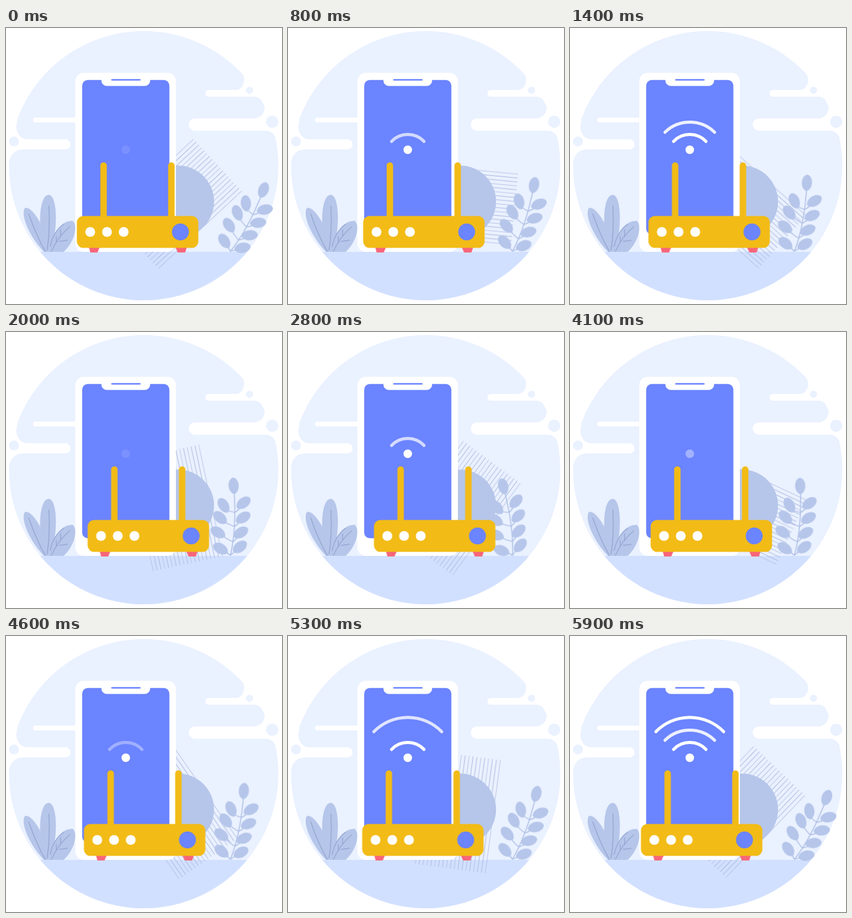
Recreate the animation shown at these times as an HTML page. Size 450 px wide and 450 px high, loop 6000 ms.

```html
<!DOCTYPE html>
<html lang="en">
<head>
<meta charset="utf-8">
<title>Router and phone</title>
<style>
  html, body { margin: 0; width: 100%; height: 100%; overflow: hidden; background: #fff; }
  svg { display: block; width: 100vw; height: 100vh; }

  .sky { fill: #eaf1ff; }
  .ground { fill: #d2e0ff; }
  .white { fill: #fff; }
  .blue { fill: #6b84ff; }
  .yellow { fill: #f2bb16; }
  .red { fill: #f8667a; }
  .leafy { fill: #b6c6ea; }
  .vein, .stem { fill: none; stroke-linecap: round; }
  .vein { stroke: #97a9d4; stroke-width: 1.5; }
  .stem { stroke: #b0c0e6; stroke-width: 1.6; }
  .hatch { stroke: #a9b8de; stroke-width: 186; stroke-dasharray: .9 5.5; }
  .wave { fill: none; stroke: #fff; stroke-width: 5; stroke-linecap: round; }

  .hatch, .plant, .router, .dot, .near, .mid, .far { animation: 6s linear infinite; }
  .hatch { animation-name: spin; transform-origin: 277px 287px; }
  .plant { animation-name: sway; transform-origin: 366px 364px; }
  .router { animation-name: slide; }
  .dot { animation-name: dot; }
  .near { animation-name: near; }
  .mid { animation-name: mid; }
  .far { animation-name: far; }

  @keyframes spin {
    0% { transform: rotate(-43deg); }
    99.2%, 100% { transform: rotate(317deg); }
  }
  @keyframes sway {
    0%, 99.2%, 100% { transform: rotate(26deg); }
    49.4% { transform: rotate(-12deg); }
  }
  @keyframes slide {
    0%, 98.6%, 100% { transform: translateX(0); }
    49.3% { transform: translateX(26px); }
  }

  /* Three signal build-ups; the last one lights the far wave before the middle one. */
  @keyframes dot {
    0% { opacity: .1; }
    7.2%, 32.49% { opacity: 1; }
    32.5% { opacity: 0; }
    40.5%, 65.32% { opacity: 1; }
    65.33% { opacity: 0; }
    73.3%, 100% { opacity: 1; }
  }
  @keyframes near {
    0%, 7.7% { opacity: 0; }
    15.7%, 32.49% { opacity: 1; }
    32.5%, 41% { opacity: 0; }
    49%, 65.32% { opacity: 1; }
    65.33%, 73.8% { opacity: 0; }
    81.8%, 100% { opacity: 1; }
  }
  @keyframes mid {
    0%, 16.2% { opacity: 0; }
    24.2%, 32.49% { opacity: 1; }
    32.5%, 49.5% { opacity: 0; }
    57.5%, 65.32% { opacity: 1; }
    65.33%, 91% { opacity: 0; }
    99.4%, 100% { opacity: 1; }
  }
  @keyframes far {
    0%, 24.7% { opacity: 0; }
    32.49% { opacity: 1; }
    32.5%, 58% { opacity: 0; }
    65.32% { opacity: 1; }
    65.33%, 82% { opacity: 0; }
    90%, 100% { opacity: 1; }
  }
</style>
</head>
<body>
<svg viewBox="0 0 450 450">
  <defs>
    <clipPath id="disc"><circle cx="224.5" cy="224.5" r="219.5"/></clipPath>
    <path id="leaf" d="M-13.5 0C-11-6-5-8.3 1-8.3C8-8.3 13.5-4 13.5 0C13.5 4 8 8.3 1 8.3C-5 8.3-11 6-13.5 0Z"/>
  </defs>

  <!-- Backdrop -->
  <g clip-path="url(#disc)">
    <rect class="sky" width="450" height="450"/>
    <rect class="ground" y="365" width="450" height="85"/>
  </g>
  <g class="white">
    <path d="M0 150H19C13 166 21 181.500 35 181.500H97A8.250 8.250 0 0 1 97 198H28C14 198 7 206 4 222H0Z"/>
    <path d="M450 74H385.500C392 86 386 101 375 101H330.500A5.500 5.500 0 0 0 330.500 112H404A17.750 17.750 0 0 1 404 147.500H308A10 10 0 0 0 308 167.500H422C434 167.500 440 174 443 192H450Z"/>
    <rect x="44" y="146" width="90" height="8" rx="4"/>
  </g>
  <g class="sky">
    <circle cx="13" cy="185" r="8"/>
    <circle cx="397" cy="101.500" r="5.700"/>
    <circle cx="434" cy="153" r="10"/>
  </g>

  <!-- Left bush -->
  <g class="leafy">
    <path d="M62 365C40 343 24 308 30 294.500C37 286 66 318 68 365Z"/>
    <path d="M65 365C50 328 54 272 69.500 272C84 272 85 328 73 365Z"/>
    <path d="M71 365C73 337 90 313 109 314.500C118 323 111 350 94 365Z"/>
  </g>
  <g class="vein">
    <path d="M37 303Q50 340 64 364M70 290Q72 330 67 362"/>
    <path d="M104 324Q85 340 74 364M89 340V329M82 350V340M87 348L100 346"/>
    <path d="M72 356Q77 332 94 320"/>
  </g>

  <!-- Hatching and disc -->
  <path class="hatch" d="M277 228.700V344.800"/>
  <circle class="leafy" cx="280.500" cy="283" r="58.700"/>

  <!-- Right plant -->
  <g class="plant leafy">
    <path class="stem" d="M366 364Q376 320 371 255M373 294Q362 293 355 286M373 294Q380 290 386 279M372 317Q360 313 350 305M372 317Q380 312 386 303M370 342Q358 337 347 328M370 342Q378 335 383 328M366 364L351 354M366 364L381 351"/>
    <use href="#leaf" transform="translate(370.500 251) rotate(-94)"/>
    <use href="#leaf" transform="translate(354.500 283) rotate(-122)"/>
    <use href="#leaf" transform="translate(386.500 278.500) rotate(-38)"/>
    <use href="#leaf" transform="translate(349 303) rotate(-138)"/>
    <use href="#leaf" transform="translate(386 302.500) rotate(-33)"/>
    <use href="#leaf" transform="translate(345.500 327) rotate(-150)"/>
    <use href="#leaf" transform="translate(382.500 327) rotate(-32)"/>
    <use href="#leaf" transform="translate(350 353.500) rotate(-150)"/>
    <use href="#leaf" transform="translate(381 350.500) rotate(-38)"/>
  </g>

  <!-- Phone -->
  <rect class="white" x="113" y="73" width="164" height="292" rx="14"/>
  <rect class="blue" x="124.200" y="84.800" width="142.200" height="251.400" rx="9"/>
  <path class="white" d="M155.500 80H235V85A9 9 0 0 1 226 94.500H164.500A9 9 0 0 1 155.500 85Z"/>
  <rect class="blue" x="171.500" y="83.200" width="48" height="2.600" rx="1.300"/>

  <!-- Signal -->
  <circle class="white dot" cx="195.300" cy="198.500" r="7"/>
  <g class="wave">
    <path class="near" d="M168.800 185A36.400 36.400 0 0 1 221.800 185"/>
    <path class="mid" d="M154.800 170A58 58 0 0 1 235.800 170"/>
    <path class="far" d="M140 156A77.300 77.300 0 0 1 250.600 156"/>
  </g>

  <!-- Router -->
  <g class="router">
    <path class="red" d="M135 357H153L149 366H137.500ZM276 357H295L292 366H280Z"/>
    <g class="yellow">
      <rect x="153.800" y="219" width="10.500" height="100" rx="5.200"/>
      <rect x="264.300" y="219" width="10.500" height="100" rx="5.200"/>
      <rect x="115.500" y="306.400" width="198" height="52.200" rx="11"/>
    </g>
    <g class="white">
      <circle cx="137.300" cy="332.500" r="8"/>
      <circle cx="164.600" cy="332.500" r="8"/>
      <circle cx="191.800" cy="332.500" r="8"/>
    </g>
    <circle class="blue" cx="284.300" cy="332.500" r="13.800"/>
  </g>
</svg>
</body>
</html>
```
